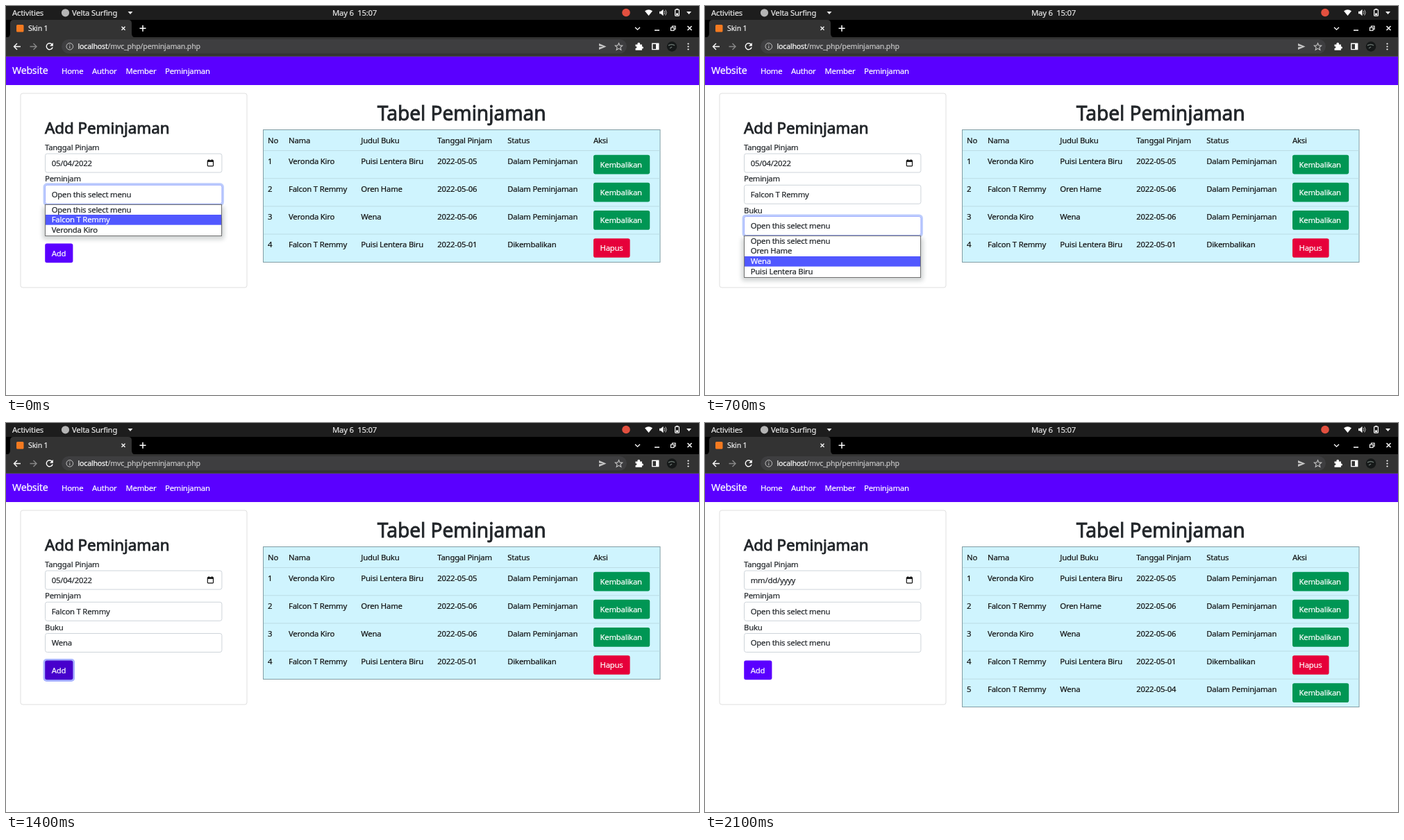
Write an HTML page that moves like this. It is 998 by 561 pixels and loops after 2800 ms.

```html
<!DOCTYPE html>
<html lang="id">
<head>
<meta charset="utf-8">
<title>Peminjaman</title>
<style>
html, body { margin: 0; width: 100%; height: 100%; overflow: hidden; background: #fff; }
svg { display: block; width: 100vw; height: 100vh; }
text { font-family: "Noto Sans", "Open Sans", sans-serif; letter-spacing: -.018em; stroke-width: .2px; white-space: pre; }
.title { letter-spacing: -.002em; stroke-width: .85px; }
</style>
</head>
<body>
<svg id="stage" viewBox="0 0 998 561" xmlns="http://www.w3.org/2000/svg"></svg>
<script>
const STEP = 700, STEPS = 4;
const INK = '#212529', BLUE = '#5a00ff', GREEN = '#009654', RED = '#e6003a';
const SIZE = 11.3, PROMPT = 'Open this select menu';
const ZED = 'Veronda Kiro', FAL = 'Falcon T Remmy';
const POEM = 'Puisi Lentera Biru', OREN = 'Oren Hame', WENA = 'Wena';
const OUT = 'Dalam Peminjaman', BACK = 'Dikembalikan';

const text = (x, y, s, fill = INK, size = SIZE, extra = '') =>
  `<text x="${x}" y="${y}" fill="${fill}" stroke="${fill}" font-size="${size}" ${extra}>${s}</text>`;
const rect = (x, y, w, h, fill, r = 0, extra = '') =>
  `<rect x="${x}" y="${y}" width="${w}" height="${h}" fill="${fill}" rx="${r}" ${extra}/>`;
const line = (d, color = '#fff', w = 1.3) =>
  `<path d="${d}" fill="none" stroke="${color}" stroke-width="${w}"/>`;
const shape = (d, fill = '#fff') => `<path d="${d}" fill="${fill}"/>`;
const dot = (x, y, r, fill) => `<circle cx="${x}" cy="${y}" r="${r}" fill="${fill}"/>`;
// Each mask digit tells whether the group shows in that step.
const during = (mask, ...parts) => `<g data-on="${mask}">${parts.join('')}</g>`;

function desktop() {
  const grey = '#e8e8e8';
  return [
    rect(0, 0, 998, 20, '#1d1d1d'),
    text(9, 13.5, 'Activities', grey),
    dot(85.5, 9.8, 5.6, '#b5b5b5'),
    text(95, 13.5, 'Velta Surfing', grey),
    shape('M175.5 8h7l-3.5 4z', grey),
    text(470, 13.5, 'May 6  15:07', grey),
    dot(893, 9.5, 5.8, '#e2503f'),
    shape('M920 7.3q5.5-4.3 11 0l-5.5 6.7z'),
    shape('M941 7.8h2.200l3.300-3v9.500l-3.300-3H941z'),
    line('M948 7q1.800 2.500 0 5M949.700 5.500q3 4 0 8', '#bbb', 1),
    rect(963.6, 5.2, 5.8, 9, 'none', 1, 'stroke="#fff" stroke-width="1.2"'),
    rect(965.3, 3.8, 2.4, 1.4, '#fff'), rect(965, 10.5, 3, 2.5, '#fff'),
    shape('M980 8h7l-3.5 4z')
  ].join('');
}

function browser() {
  const dim = '#c4c4c4';
  return [
    rect(0, 20, 998, 25.5, '#000'),
    shape('M0 45.5q6 0 6-6V25q0-5 5-5h165q5 0 5 5v14.5q0 6 6 6z', '#333'),
    rect(15, 27, 10.5, 10.5, '#f47a20', 1.5),
    text(32, 36, 'Skin 1', '#eee', 10.6),
    line('M166.5 29.7l5 5m0-5l-5 5'),
    line('M192.5 32.2h9m-4.5-4.5v9', '#fff', 1.5),
    line('M906 30.7l3.5 3.5 3.5-3.5M934 35h7'),
    line('M957.5 31h4.5v4.5h-4.5zM959.5 31v-2h4.5v4.5h-2', '#fff', 1.2),
    line('M981.5 29l6 6m0-6l-6 6', '#fff', 1.5),
    rect(0, 45, 998, 27, '#333'), rect(0, 72, 998, 1, '#484848'),
    rect(80, 48, 814, 20.5, '#3e3e40', 10.2),
    line('M21 58.5h-9.5M16 54l-4.5 4.5L16 63', '#fff', 1.4),
    line('M34.5 58.5H44M39.5 54l4.5 4.5-4.5 4.5', '#888', 1.4),
    line('M66.3 55.5a4.5 4.5 0 1 0 .8 4', '#fff', 1.4),
    shape('M67.8 53v4.800H63z'),
    line('M87 58.3a4.8 4.8 0 1 0 9.6 0a4.8 4.8 0 1 0-9.6 0M91.8 57.7v3.3M91.8 55.3v1.2', dim, 1),
    text(103.5, 62, `localhost<tspan fill="${dim}" stroke="${dim}">/mvc_php/peminjaman.php</tspan>`, '#fff', 10.6),
    shape('M854 54l10.5 4.5-10.5 4.5v-3.6l6-.9-6-.9z', dim),
    line('M882.5 53.5l1.5 3.4 3.7.3-2.8 2.5.9 3.6-3.3-2-3.3 2 .9-3.6-2.8-2.5 3.7-.3z', dim, 1.1),
    shape('M906.5 55.5h3q-.6-2.8 1.7-2.8t1.7 2.8h3v3q2-.5 2 1.4t-2 1.4v2.5h-9.4v-2.8q2 0 2-1.4t-2-1.3z'),
    line('M930.7 54.2h9v8.4h-9z', '#fff', 1.4), rect(936, 54, 3.7, 8.7, '#fff'),
    dot(959, 58.5, 7.2, '#151818'),
    line('M954 57q5-3 9 0M956 61l3-2', '#66716d', 1.5),
    [54.5, 58.5, 62.5].map(y => dot(982.5, y, 1.1, '#fff')).join('')
  ].join('');
}

function nav() {
  const links = [[80, 'Home'], [124, 'Author'], [172.5, 'Member'], [229, 'Peminjaman']];
  return rect(0, 73, 998, 41, BLUE) + text(9, 98.3, 'Website', '#fff', 14.2) +
    links.map(([x, s]) => text(x, 97.6, s, '#fff')).join('');
}

const field = y => rect(56.5, y + .3, 254.4, 27, '#fff', 2.8, 'stroke="#ced4da"');
const value = (y, s) => text(65.7, y + 18, s);
const button = (x, y, w, s, fill) => rect(x, y, w, 27.7, fill, 2.8) + text(x + 9.5, y + 18, s, '#fff');

// Focused select with its open list below.
function list(y, options, chosen) {
  const top = Math.round(y + 27.8), h = options.length * 14.8 + 1;
  return rect(55, y - 1.2, 257.4, 30, '#fff', 4, 'stroke="#bdcdfd" stroke-width="3"') +
    rect(56.5, y + .3, 254.4, 27, '#fff', 2.8, 'stroke="#8f9dff" stroke-width=".8"') +
    value(y, PROMPT) +
    rect(53, top + 3, 261, h + 2, '#122', 3, 'opacity=".2" filter="url(#soft)"') +
    rect(56.5, top + .5, 254, Math.round(h - .5), '#fff', 0, 'stroke="#707070"') +
    options.map((s, i) => {
      const rowY = top + .5 + i * 14.8, on = i === chosen;
      return (on ? rect(57, Math.round(rowY - .3), 253, 14.7, '#5158ff') : '') +
        text(65.7, rowY + 11, s, on ? '#fff' : INK);
    }).join('');
}

function form() {
  return [
    rect(21, 126, 326, 280, '#fff', 3, 'stroke="#dfdfdf"'),
    text(56, 184, 'Add Peminjaman', INK, 22.4, 'class="title"'),
    text(56, 208, 'Tanggal Pinjam'), field(212.7),
    during('1110', value(212.7, '05/04/2022')),
    during('0001', value(212.7, 'mm/dd/yyyy')),
    rect(290.3, 223, 8.2, 7.8, 'none', .8, 'stroke="#111" stroke-width="1.2"'),
    rect(290, 222.3, 8.8, 2.6, '#111'), rect(291.5, 221.2, 1.3, 2, '#111'), rect(296, 221.2, 1.3, 2, '#111'),
    text(56, 253.3, 'Peminjam'), field(258),
    during('0110', value(258, FAL)),
    during('0001', value(258, PROMPT)),
    text(56, 298.5, 'Buku'), field(303.2),
    during('0010', value(303.2, WENA)),
    during('0001', value(303.2, PROMPT)),
    button(56.2, 342.6, 40.2, 'Add', BLUE),
    during('0010',
      rect(53.5, 340, 45.6, 33, '#a9b3ff', 5),
      button(56.2, 342.6, 40.2, 'Add', '#4700cc')),
    during('1000', list(258, [PROMPT, FAL, ZED], 1)),
    during('0100', list(303.2, [PROMPT, OREN, WENA, POEM], 2))
  ].join('');
}

function table() {
  const cols = [377, 407, 511.3, 621.3, 722.3, 846], gap = 40.15;
  const cells = (y, row) => row.map((s, i) => text(cols[i], y, s, '#111')).join('');
  const frame = rows =>
    rect(370.5, 178.5, 571.5, Math.round(30 + rows * gap), '#cff4fe', 0, 'stroke="#819da4"');
  const rows = [
    [ZED, POEM, '2022-05-05', OUT],
    [FAL, OREN, '2022-05-06', OUT],
    [ZED, WENA, '2022-05-06', OUT],
    [FAL, POEM, '2022-05-01', BACK],
    [FAL, WENA, '2022-05-04', OUT]
  ].map((row, i) => {
    const y = 208.6 + i * gap, back = row[3] === BACK;
    return line(`M371 ${y}H941.5`, '#bbdce4', 1) + cells(y + 19.2, [i + 1, ...row]) +
      button(846, y + 6.1, back ? 52.6 : 81.2, back ? 'Hapus' : 'Kembalikan', back ? RED : GREEN);
  });
  return text(656.2, 164.5, 'Tabel Peminjaman', INK, 28.2, 'class="title" text-anchor="middle"') +
    during('1110', frame(4)) + during('0001', frame(5)) +
    cells(197.7, ['No', 'Nama', 'Judul Buku', 'Tanggal Pinjam', 'Status', 'Aksi']) +
    rows.slice(0, 4).join('') + during('0001', rows[4]);
}

const stage = document.getElementById('stage');
stage.innerHTML = '<defs><filter id="soft" x="-10%" y="-40%" width="120%" height="180%">' +
  '<feGaussianBlur stdDeviation="3"/></filter></defs>' +
  desktop() + browser() + nav() + form() + table();

for (const g of stage.querySelectorAll('[data-on]')) {
  const mask = g.dataset.on;
  const frames = [...mask, mask[STEPS - 1]].map((bit, i) =>
    ({ opacity: +bit, offset: i / STEPS, easing: 'step-end' }));
  g.animate(frames, { duration: STEP * STEPS, iterations: Infinity }).startTime = 0;
}
</script>
</body>
</html>
```
